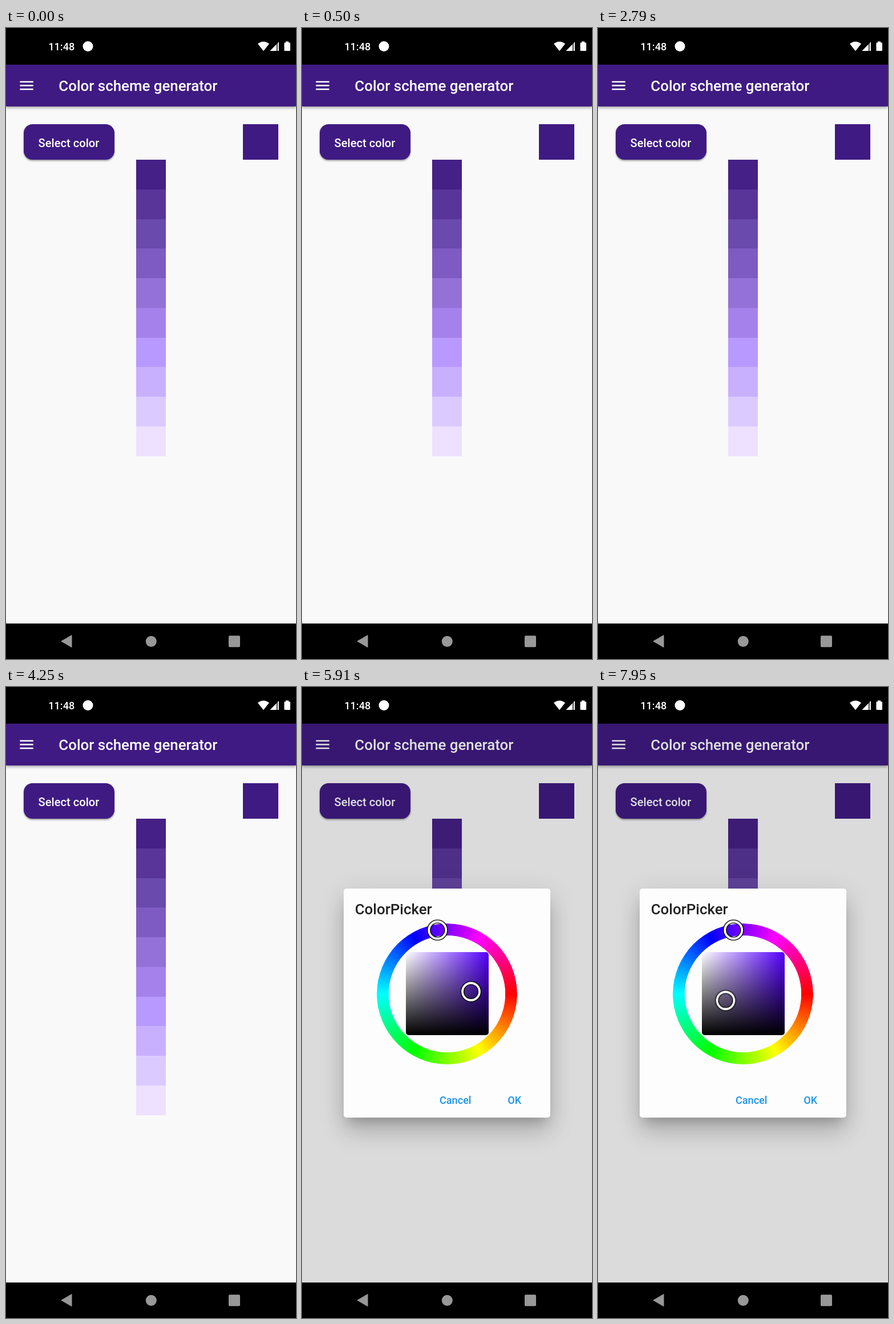
Animation, 508 px wide and 1102 px high, one loop 8000 ms. Source, as an HTML page:

```html
<!DOCTYPE html>
<html lang="en">
<head>
<meta charset="utf-8">
<title>Color scheme generator</title>
<style>
  html, body { margin: 0; width: 100%; height: 100%; overflow: hidden; background: #000; }
  body { position: relative; font: 500 18.1px/1 Roboto, sans-serif; }
  svg, div { position: absolute; }
  svg { left: 0; top: 0; overflow: visible; }

  .page { left: 0; top: 64px; width: 508px; height: 976px; background: #f9f9fa; overflow: hidden; }
  .bar { left: 0; top: 0; width: 508px; height: 72.5px; background: #3f1a82; box-shadow: 0 2px 5px rgba(0, 0, 0, .4); }
  .button { left: 31px; top: 104px; width: 159px; height: 62px; border-radius: 15.5px; background: #3f1a82; box-shadow: 0 2px 3px rgba(0, 0, 0, .38); }
  .swatch { left: 415px; top: 104px; width: 62px; height: 62px; background: #3f1a82; }
  .scale { left: 228px; top: 166px; width: 52px; height: 517.5px; }
  .scale div { width: 100%; height: 10.1%; }
  .barrier { inset: 0; background: #000; animation: dim 8s infinite; }

  .dialog {
    left: 73px; top: 352px; width: 362px; height: 400px; border-radius: 5px; background: #fdfdfd;
    box-shadow: 0 14px 19px -9px rgba(0, 0, 0, .2), 0 27px 42px 1px rgba(0, 0, 0, .14), 0 10px 44px 5px rgba(0, 0, 0, .1);
    animation: appear 8s infinite;
  }
  .hues {
    left: 58px; top: 60.5px; width: 246px; height: 246px; border-radius: 50%;
    background: conic-gradient(from 90deg, #f00, #ff0, #0f0, #0ff, #00f, #f0f, #f00);
    -webkit-mask: radial-gradient(circle, transparent 101.7px, #000 102.5px);
    mask: radial-gradient(circle, transparent 101.7px, #000 102.5px);
  }
  .shades {
    left: 109px; top: 111px; width: 144.5px; height: 145px; border-radius: 5px;
    background: linear-gradient(transparent, #000), linear-gradient(90deg, #fff, #50f);
  }
  .ring { fill: none; stroke: #000; stroke-width: 6.6px; }
  .ring + .ring { stroke: #fff; stroke-width: 3.8px; }
  .picker { animation: drag 8s infinite; }

  @keyframes dim {
    0%, 65.3875% { opacity: 0; animation-timing-function: ease; }
    67.2625%, 100% { opacity: .123; }
  }
  @keyframes appear {
    0%, 65.3875% { opacity: 0; animation-timing-function: ease-out; }
    67.2625%, 100% { opacity: 1; }
  }
  @keyframes drag {
    0%, 92.125% { transform: translate(223px, 180px); animation-timing-function: cubic-bezier(.35, .1, .65, .9); }
    99.375%, 100% { transform: translate(150.5px, 195.5px); }
  }
</style>
</head>
<body>
  <div class="page">
    <div class="scale"></div>
    <div class="bar"></div>
    <div class="button"></div>
    <div class="swatch"></div>
    <svg width="508" height="976" fill="#fff">
      <path d="M24.4 28.7h23.4v2.6H24.4zm0 6.5h23.4v2.6H24.4zm0 6.5h23.4v2.6H24.4z"/>
      <text x="92.3" y="46" font-size="25.87">Color scheme generator</text>
      <text x="56.6" y="143.7" font-size="20.13">Select color</text>
    </svg>
    <div class="barrier"></div>
  </div>

  <svg width="508" height="1102" fill="#fff">
    <text x="74.3" y="39.2">11:48</text>
    <circle cx="143.5" cy="32" r="9"/>
    <path d="M441 27.6q10-7.6 20 0L451 40.2z"/>
    <path d="M478 24.3V40h-15.5z" opacity=".4"/>
    <path d="M473.5 28.8V40h-11zM476.3 26V40h1.7V24.3z"/>
    <path d="M490 23.5h5v2h1.7q1.3 0 1.3 1.3v12q0 1.3-1.3 1.3h-8q-1.3 0-1.3-1.3v-12q0-1.3 1.3-1.3h1.3z"/>
    <g fill="#989898">
      <path d="M97 1071l18-10.5v21z" stroke="#989898" stroke-linejoin="round"/>
      <circle cx="254.3" cy="1071.2" r="9.5"/>
      <rect x="390" y="1061.2" width="20" height="20" rx="2"/>
    </g>
  </svg>

  <div class="dialog">
    <div class="hues"></div>
    <div class="shades"></div>
    <svg width="362" height="400">
      <text x="19.7" y="45" font-size="25.87" fill="#212121">ColorPicker</text>
      <g fill="#1b93ea">
        <text x="168" y="375.6">Cancel</text>
        <text x="287.2" y="375.6">OK</text>
      </g>
      <g transform="translate(164.3 72.5)">
        <circle class="ring" r="15"/>
        <circle class="ring" r="15"/>
      </g>
      <g class="picker">
        <circle class="ring" r="15"/>
        <circle class="ring" r="15"/>
      </g>
    </svg>
  </div>

<script>
  const tones = ["#452086", "#59359a", "#6a4aad", "#7e5bc2", "#9371d6",
                 "#a582eb", "#b899ff", "#c9b0ff", "#dbcaff", "#ede1ff"];
  const scale = document.querySelector(".scale");
  tones.forEach((tone, i) => {
    const step = document.createElement("div");
    step.style.background = tone;
    step.style.top = i * 51.75 + "px";
    step.style.height = "51.75px";
    scale.append(step);
  });
</script>
</body>
</html>
```
